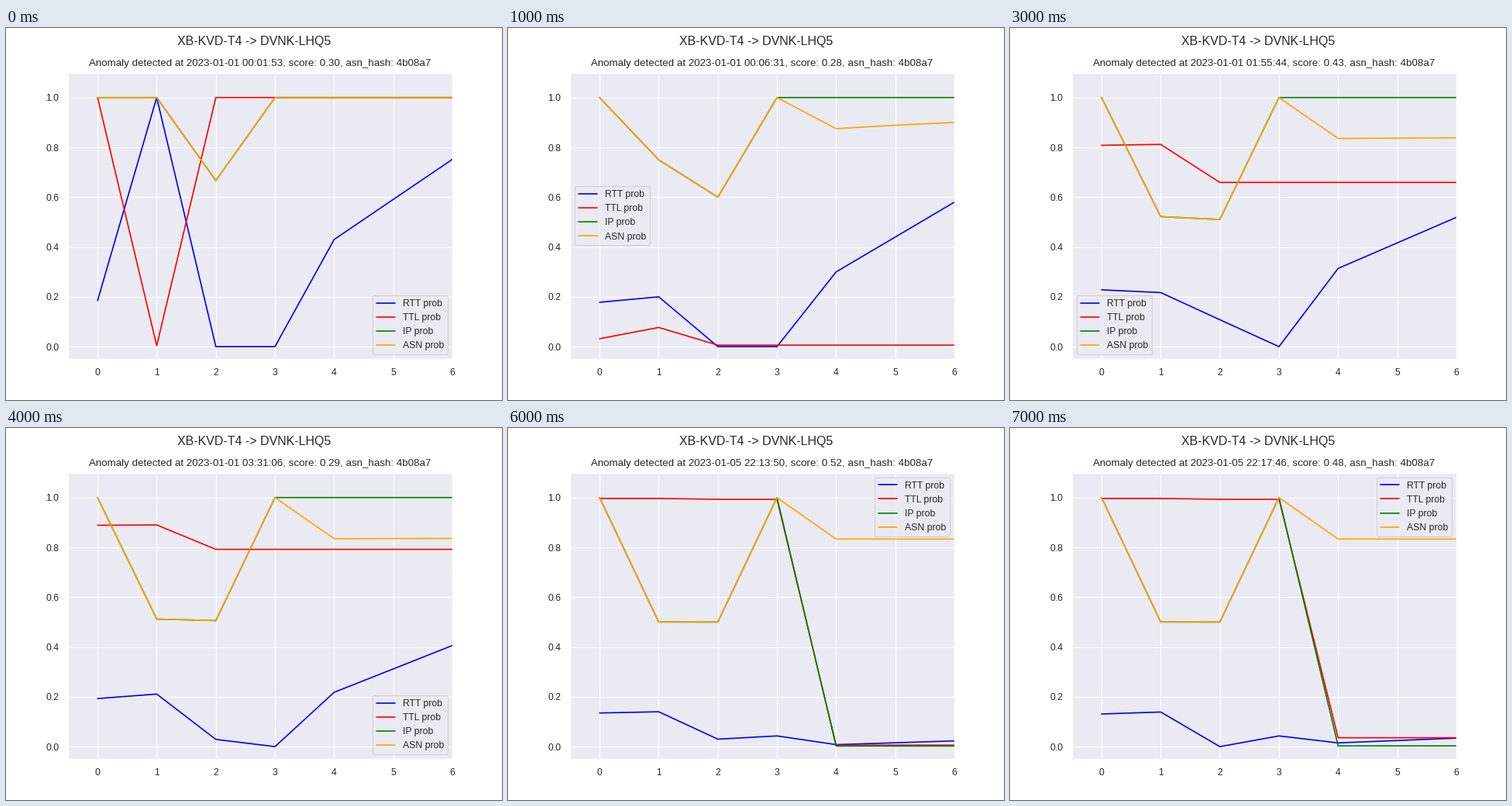
These frames come from a looping animation (640 px wide and 480 px high, 8 s). A matplotlib script:

```python
import math

import matplotlib.pyplot as plt
import numpy as np
from matplotlib.animation import FuncAnimation

# Dark grid look at a compact "paper" scale
plt.rcParams.update({
    "font.family": "Liberation Sans",
    "font.size": 9.6,
    "text.color": ".15",
    "axes.facecolor": "#EAEAF2",
    "axes.edgecolor": "white",
    "axes.linewidth": 1.0,
    "axes.titlesize": 9.6,
    "axes.grid": True,
    "axes.axisbelow": True,
    "grid.color": "white",
    "grid.linewidth": 0.8,
    "lines.linewidth": 1.2,
    "lines.solid_capstyle": "round",
    "patch.linewidth": 0.8,
    "legend.fontsize": 8.8,
    "figure.titlesize": 11.52,
})
for axis in ("xtick", "ytick"):
    plt.rcParams.update({
        f"{axis}.color": ".15",
        f"{axis}.labelsize": 8.8,
        f"{axis}.major.size": 4.8,
        f"{axis}.major.pad": 3.5,
    })

HOPS = range(7)
SERIES = {"RTT": "blue", "TTL": "red", "IP": "green", "ASN": "orange"}
REROUTE_DAY = 5

# Day, time, score and round-trip key points at hops 0, 1, 2, 4 and 6
EVENTS = [
    (1, "00:01:53", 0.30, (.185, 1, 0, .43, .752)),
    (1, "00:06:31", 0.28, (.178, .2, 0, .3, .58)),
    (1, "00:11:10", 0.27, (.172, .209, 0, .207, .436)),
    (1, "01:55:44", 0.43, (.228, .217, .108, .314, .519)),
    (1, "03:31:06", 0.29, (.193, .211, .029, .218, .406)),
    (5, "22:09:56", 0.57, (.141, .142, .063, 0, .011)),
    (5, "22:13:50", 0.52, (.135, .14, .03, .008, .023)),
    (5, "22:17:46", 0.48, (.131, .139, 0, .015, .034)),
]
FIRST_REROUTE = next(i for i, e in enumerate(EVENTS) if e[0] == REROUTE_DAY)


def rounds_seen(day, clock):
    """Probe rounds so far; two probes make one round."""
    h, m, s = map(int, clock.split(":"))
    minutes = (day - 1) * 1440 + h * 60 + m + s / 60
    return math.floor(minutes / 5.25) / 2


def share(limit, count):
    """Falls from 1 to the limit as the count grows."""
    return limit + (1 - limit) / (count + 1)


def trust(n, weight, offset):
    return math.exp(-weight / (0.42 * n + offset))


def far_trust(n):
    return trust(n, 2, 0.18) if n else 1


def curves(i):
    day, clock, _, (r0, r1, r2, r4, r6) = EVENTS[i]
    n = rounds_seen(day, clock)
    rerouted = day == REROUTE_DAY
    age = (i - FIRST_REROUTE) / 2  # rounds on the new route

    rtt = [r0, r1, r2, 0.043 if rerouted else 0, r4, (r4 + r6) / 2, r6]

    near = trust(n, 1, 0.08) if n else 1
    ttl = [near, trust(n, 1, 0.18)] + [far_trust(n)] * 2
    ttl += [far_trust(age if rerouted else n)] * 3

    head = [1, share(1 / 2, 2 * n), share(1 / 2, 4 * n + 2), 1]
    ip = head + [0.0015 * (age + 1) if rerouted else 1] * 3
    asn = head + [share(5 / 6, 12 * n / k) for k in (2, 3, 4)]
    return rtt, ttl, ip, asn


fig, ax = plt.subplots(figsize=(6.4, 4.8), dpi=100)
fig.suptitle("XB-KVD-T4 -> DVNK-LHQ5")
ax.set_xlim(-0.5, 6)
ax.set_ylim(-0.05, 1.1)
ax.set_xticks(HOPS)
ax.tick_params(bottom=False, left=False)

lines = [ax.plot(HOPS, np.zeros(len(HOPS)), color=color,
                 label=f"{name} prob")[0]
         for name, color in SERIES.items()]
# "best" moves the legend to whichever spot the curves leave free
ax.legend(loc="best", facecolor="inherit", edgecolor=".8", framealpha=0.8)


def draw(i):
    day, clock, score, _ = EVENTS[i]
    for line, values in zip(lines, curves(i)):
        line.set_ydata(values)
    ax.set_title(f"Anomaly detected at 2023-01-{day:02d} {clock}, "
                 f"score: {score:.2f}, asn_hash: 4b08a7")
    return lines


anim = FuncAnimation(fig, draw, frames=len(EVENTS), interval=1000,
                     repeat=True, repeat_delay=0, blit=False)
plt.show()
```
